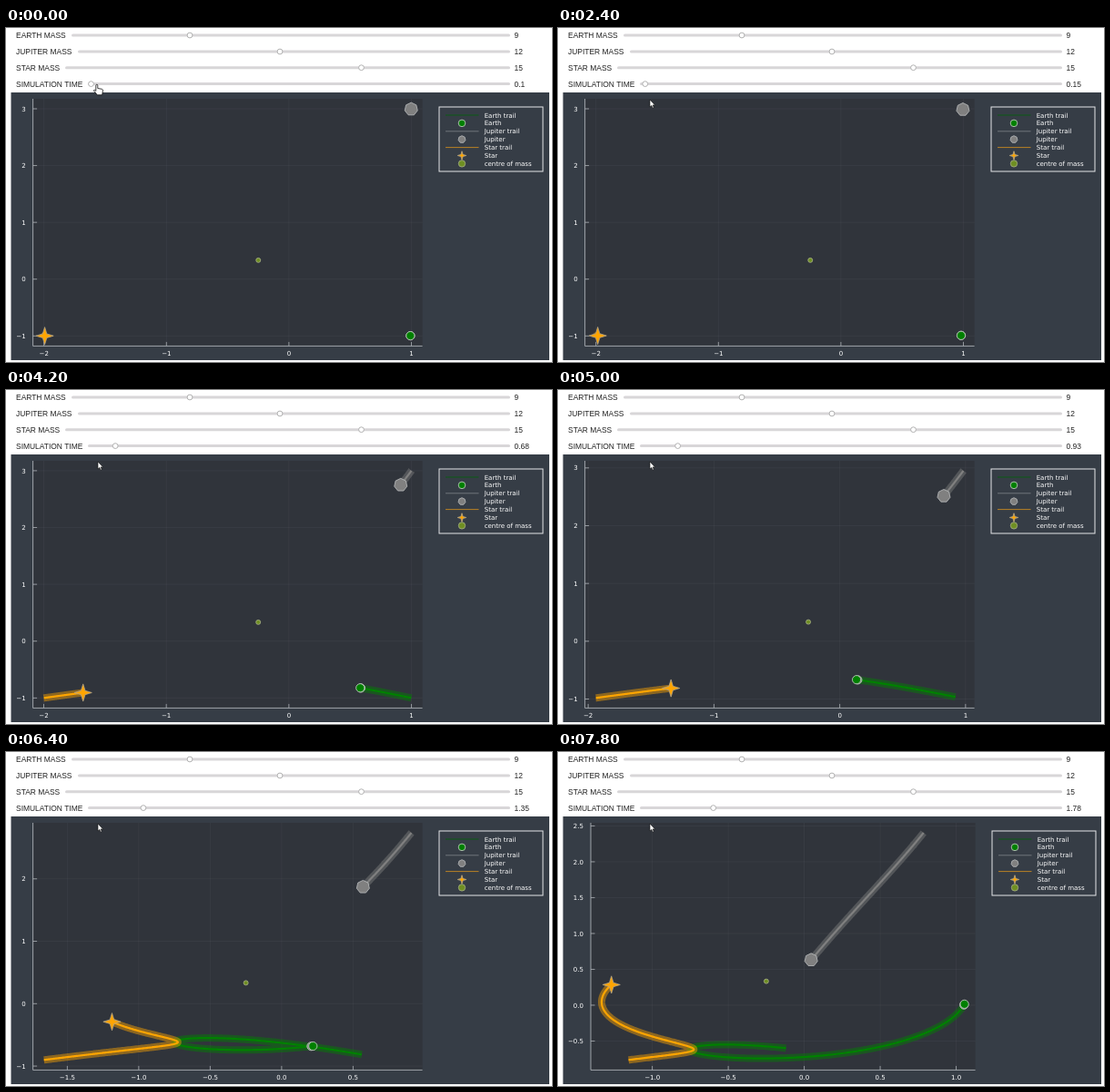
Recreate the animation shown at these times as an HTML page. Size 600 by 368 pixels, loop 8000 ms.

```html
<!DOCTYPE html>
<html lang="en">
<head>
<meta charset="utf-8">
<title>Three-body simulation</title>
<style>
  html, body { margin: 0; width: 100%; height: 100%; overflow: hidden; background: #fff; }
  svg { display: block; width: 600px; height: 368px; }
  .ui { font: 8.45px "Liberation Sans", Arial, sans-serif; fill: #222; }
  .plot { font: 7px "DejaVu Sans", sans-serif; fill: #fff; }
</style>
</head>
<body>
<svg id="stage" viewBox="0 0 600 368" xmlns="http://www.w3.org/2000/svg"></svg>
<script>
const LOOP = 8000, STEP = 200;
const NS = "http://www.w3.org/2000/svg";
const stage = document.getElementById("stage");

function add(parent, tag, attrs, text) {
  const el = document.createElementNS(NS, tag);
  set(el, attrs);
  if (text !== undefined) el.textContent = text;
  parent.appendChild(el);
  return el;
}
function set(el, attrs) {
  for (const k in attrs) el.setAttribute(k, attrs[k]);
}
function lerpKnots(knots, x) {
  if (x <= knots[0][0]) return knots[0][1];
  for (let i = 1; i < knots.length; i++) {
    const [x0, y0] = knots[i - 1], [x1, y1] = knots[i];
    if (x <= x1) return y0 + (y1 - y0) * (x - x0) / (x1 - x0);
  }
  return knots[knots.length - 1][1];
}

// --- Gravity: Earth, Jupiter and star start at rest, G = 1 ---
const MASS = [9, 12, 15];
const START = [1, -1, 1, 3, -2, -1];

function deriv(s) {
  const d = [...s.slice(6), 0, 0, 0, 0, 0, 0];
  for (let i = 0; i < 3; i++) for (let j = 0; j < 3; j++) {
    if (i === j) continue;
    const dx = s[2 * j] - s[2 * i], dy = s[2 * j + 1] - s[2 * i + 1];
    const f = MASS[j] / Math.hypot(dx, dy) ** 3;
    d[6 + 2 * i] += f * dx;
    d[7 + 2 * i] += f * dy;
  }
  return d;
}
function rk4(s, h) {
  const mix = (k, c) => s.map((v, i) => v + c * k[i]);
  const a = deriv(s), b = deriv(mix(a, h / 2)), c = deriv(mix(b, h / 2)), d = deriv(mix(c, h));
  return s.map((v, i) => v + h / 6 * (a[i] + 2 * b[i] + 2 * c[i] + d[i]));
}
function simulate(end) {
  const out = [];
  let s = [...START, 0, 0, 0, 0, 0, 0], t = 0;
  while (t < end) {
    out.push({ t, p: s.slice(0, 6) });
    const r = Math.hypot(s[0] - s[4], s[1] - s[5]);
    const h = Math.min(0.004, 0.006 * r ** 1.5);
    s = rk4(s, h);
    t += h;
  }
  out.push({ t, p: s.slice(0, 6) });
  return out;
}
const track = simulate(1.9);

function indexAfter(t) {
  let lo = 1, hi = track.length - 1;
  while (lo < hi) {
    const mid = (lo + hi) >> 1;
    if (track[mid].t > t) hi = mid; else lo = mid + 1;
  }
  return lo;
}
function bodiesAt(t) {
  const i = indexAfter(t), a = track[i - 1], b = track[i];
  const u = (t - a.t) / (b.t - a.t);
  return a.p.map((v, k) => v + (b.p[k] - v) * u);
}
function history(from, to) {
  const mid = track.slice(indexAfter(from), indexAfter(to)).map(q => q.p);
  return [bodiesAt(from), ...mid, bodiesAt(to)];
}

// --- Timing ---
const RUN = [[2400, 0.15], [4200, 0.68], [5600, 1.12], [6400, 1.35], [7200, 1.59], [7800, 1.78]];
const TAIL = [[0.63, 0], [1.12, 0.503], [1.35, 0.695], [1.59, 0.88], [1.78, 1.022]];

function simTime(ms) {
  if (ms < 1800) return 0.1;
  if (ms < 2400) return 0.11;
  return Math.round(lerpKnots(RUN, ms) * 100) / 100;
}

// --- Shapes ---
function ring(n, radius) {
  let d = "";
  for (let i = 0; i < n; i++) {
    const a = -Math.PI / 2 + i * 2 * Math.PI / n, r = radius(i);
    d += (i ? "L" : "M") + (r * Math.cos(a)).toFixed(2) + " " + (r * Math.sin(a)).toFixed(2);
  }
  return d + "Z";
}
const earth = (g, r) => add(g, "circle", { r, fill: "#008000", stroke: "#bcc4bc", "stroke-width": 0.9 });
const jupiter = (g, r) => add(g, "path", { d: ring(7, () => r), fill: "#808080", stroke: "#bdbfc1", "stroke-width": 0.8 });
const star = (g, r) => add(g, "path", { d: ring(8, i => i % 2 ? r * 0.33 : r), fill: "#ffa500", stroke: "#b3a588", "stroke-width": 0.8 });
const centre = (g, r) => add(g, "circle", { r, fill: "#6f8f23", stroke: "#a9b089", "stroke-width": 0.8 });
const place = (el, x, y) => set(el, { transform: `translate(${x.toFixed(2)} ${y.toFixed(2)})` });

// --- Sliders ---
function slider(label, y, left, thumb, value) {
  add(stage, "text", { class: "ui", x: 11, y: y + 3 }, label);
  add(stage, "rect", { x: left, y: y - 1.5, width: 554 - left, height: 3, rx: 1.5, fill: "#d8d6d8" });
  const knob = add(stage, "circle", { cx: thumb, cy: y, r: 2.9, fill: "#fff", stroke: "#aaa", "stroke-width": 0.9 });
  const text = add(stage, "text", { class: "ui", x: 558.5, y: y + 3 }, value);
  return { knob, text };
}
slider("EARTH MASS", 8, 72, 202, "9");
slider("JUPITER MASS", 26, 79, 301, "12");
slider("STAR MASS", 43.7, 65, 390.5, "15");
const timer = slider("SIMULATION TIME", 61.6, 90, 93.5, "0.1");

// --- Plot ---
const TOP = 78, BOTTOM = 350.4, Y_MAX = 89, Y_MIN = 339.3;
const FG = "#adb2b7";
add(stage, "rect", { x: 5.5, y: 71, width: 591.5, height: 295, fill: "#363d46" });
const panel = add(stage, "rect", { y: TOP, height: BOTTOM - TOP, fill: "#30343b" });
const axes = add(stage, "g", { class: "plot" });

const trails = [], marks = [];
let ghost;
[["#008000", earth, 4.6], ["#808080", jupiter, 7.2], ["#ffa500", star, 9.6]].forEach(([color, shape, size], i) => {
  const line = (w, o) => add(stage, "path", {
    fill: "none", stroke: color, "stroke-width": w, "stroke-opacity": o, "stroke-linejoin": "round"
  });
  trails.push([line(8, 0.45), line(2.2, 1)]);
  if (i === 0) ghost = add(stage, "circle", { r: 4.6, fill: "#7d857f", stroke: "#bcc4bc", "stroke-width": 0.9 });
  marks.push(shape(stage, size));
});
const com = centre(stage, 2.5);

// --- Legend ---
const legend = add(stage, "g", { class: "plot" });
add(legend, "rect", { x: 476, y: 87, width: 114, height: 71, fill: "#363d46", stroke: "#e4e6e8", "stroke-width": 1 });
[
  ["Earth trail", "#0a5a14"], ["Earth", g => earth(g, 3.8)],
  ["Jupiter trail", "#70757b"], ["Jupiter", g => jupiter(g, 4)],
  ["Star trail", "#b98124"], ["Star", g => star(g, 4.8)],
  ["centre of mass", g => centre(g, 3.7)]
].forEach(([label, key], i) => {
  const y = 96 + i * 8.9;
  if (typeof key === "string") add(legend, "path", { d: `M483 ${y}H519.5`, stroke: key, "stroke-width": 1 });
  else place(key(legend), 501, y);
  add(legend, "text", { x: 525.7, y: y + 2.5 }, label);
});

// --- Pointer ---
const hand = add(stage, "path", {
  d: "M0 .8Q.1 0 1 0T2 .9V4.2L6.6 5Q7.8 5.3 7.7 6.6L6.8 11.5H1.6L-2.2 7Q-2.5 5.8-1.4 6L0 7Z",
  fill: "#fff", stroke: "#111", "stroke-width": 0.8
});
const arrow = add(stage, "path", {
  d: "M0 0V8L1.8 6.4L3 9.2L4.3 8.6L3.1 5.9H5.5Z",
  fill: "#fff", stroke: "#111", "stroke-width": 0.6
});

function ticks(lo, hi) {
  const inside = step => {
    const out = [];
    for (let k = Math.ceil(lo / step); k * step <= hi; k++) out.push(k * step);
    return out;
  };
  const whole = inside(1);
  return whole.length >= 4 ? { at: whole, digits: 0 } : { at: inside(0.5), digits: 1 };
}
const tickText = (v, digits) => (v < 0 ? "\u2212" : "") + Math.abs(v).toFixed(digits);

function drawPlot(t) {
  const pts = history(lerpKnots(TAIL, t), t);
  let x0 = Infinity, x1 = -Infinity, y0 = Infinity, y1 = -Infinity;
  for (const p of pts) for (let i = 0; i < 6; i += 2) {
    x0 = Math.min(x0, p[i]); x1 = Math.max(x1, p[i]);
    y0 = Math.min(y0, p[i + 1]); y1 = Math.max(y1, p[i + 1]);
  }
  const ky = (Y_MIN - Y_MAX) / (y1 - y0);
  const sy = v => Y_MIN - (v - y0) * ky;
  const yt = ticks(y0 - (BOTTOM - Y_MIN) / ky, y1 + (Y_MAX - TOP) / ky);

  // Longer y labels push the panel right
  const wide = yt.digits > 0;
  const left = wide ? 36 : 29.6, right = wide ? 458.6 : 457.6;
  const pad = (x1 - x0) * 0.03;
  const kx = (right - left) / (x1 - x0 + 2 * pad);
  const sx = v => left + (v - x0 + pad) * kx;
  const xt = ticks(x0 - pad, x1 + pad);

  set(panel, { x: left, width: right - left });
  set(legend, { transform: `translate(${wide ? 1 : 0} 0)` });

  axes.replaceChildren();
  const rule = (d, opacity) => add(axes, "path", { d, stroke: FG, "stroke-opacity": opacity, "stroke-width": 0.9, fill: "none" });
  for (const v of xt.at) {
    const x = sx(v);
    rule(`M${x} ${TOP}V${BOTTOM}`, 0.07);
    rule(`M${x} ${BOTTOM}v-4.5`, 0.9);
    add(axes, "text", { x, y: 361, "text-anchor": "middle" }, tickText(v, xt.digits));
  }
  for (const v of yt.at) {
    const y = sy(v);
    rule(`M${left} ${y}H${right}`, 0.07);
    rule(`M${left} ${y}h4.5`, 0.9);
    add(axes, "text", { x: left - 8, y: y + 2.6, "text-anchor": "end" }, tickText(v, yt.digits));
  }
  rule(`M${left} ${TOP}V${BOTTOM}H${right}`, 1);

  const now = pts[pts.length - 1];
  trails.forEach((pair, i) => {
    const d = "M" + pts.map(p => sx(p[2 * i]).toFixed(2) + " " + sy(p[2 * i + 1]).toFixed(2)).join("L");
    pair.forEach(line => set(line, { d }));
    place(marks[i], sx(now[2 * i]), sy(now[2 * i + 1]));
  });
  const before = bodiesAt(t - 0.004);
  place(ghost, sx(before[0]), sy(before[1]));
  place(com, sx(-0.25), sy(1 / 3));
}

function drawPointer(ms) {
  const onKnob = ms < 600;
  set(hand, { visibility: onKnob ? "visible" : "hidden" });
  set(arrow, { visibility: onKnob ? "hidden" : "visible" });
  place(hand, ms < 200 ? 98.8 : 99.3, 62.3);
  place(arrow, 101, lerpKnots([[400, 66], [1200, 79]], ms));
}

let shown = -1;
function render(ms) {
  const tick = Math.floor((ms % LOOP) / STEP) * STEP;
  if (tick === shown) return;
  shown = tick;
  const t = simTime(tick);
  set(timer.knob, { cx: 88.9 + 45.95 * t });
  timer.text.textContent = String(t);
  drawPlot(t);
  drawPointer(tick);
}

let origin = null;
function frame(now) {
  if (origin === null) origin = now;
  render(now - origin);
  requestAnimationFrame(frame);
}
render(0);
requestAnimationFrame(frame);
</script>
</body>
</html>
```
